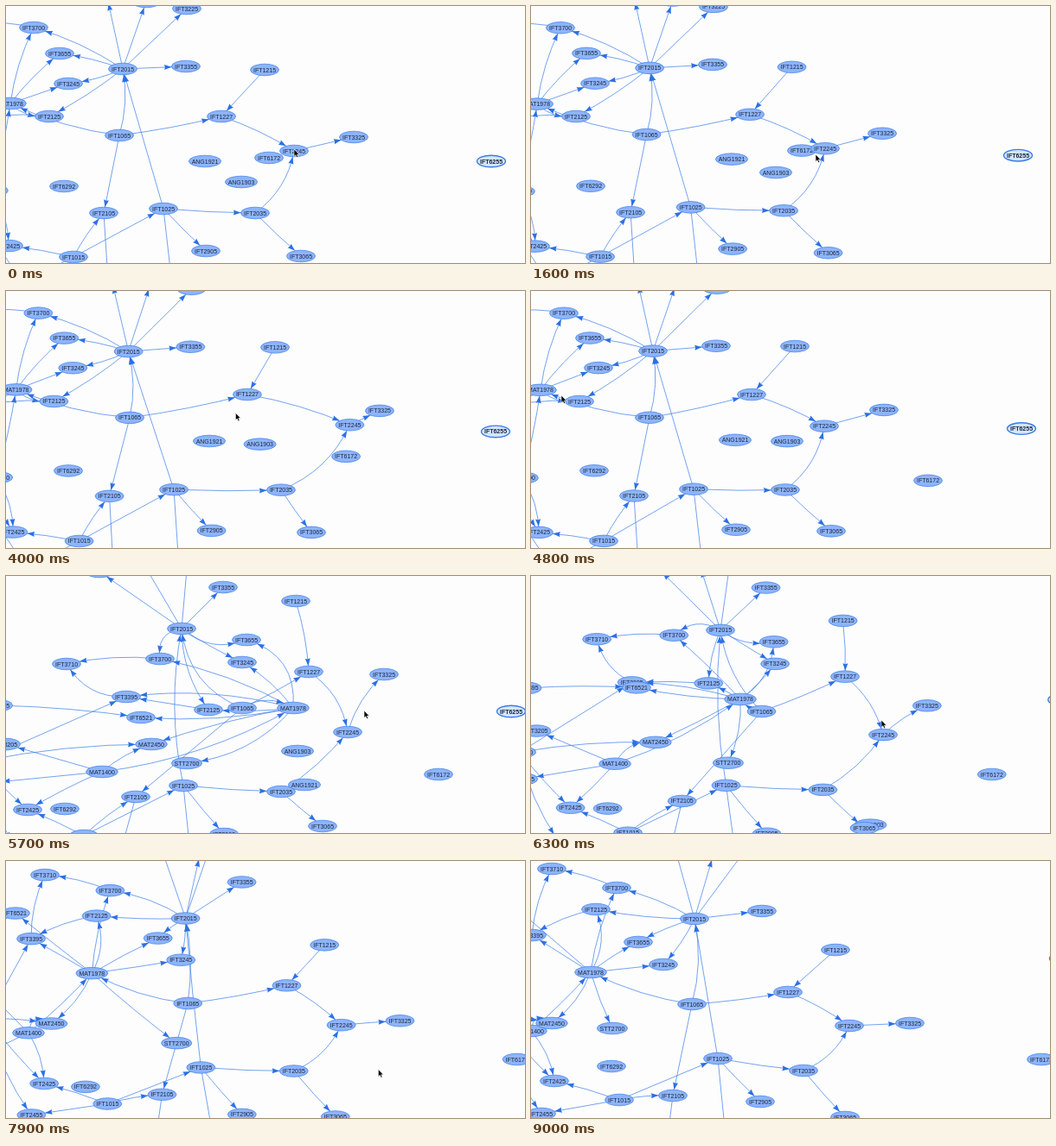
Write an HTML page that moves like this. It is 600x298 px and loops after 9.1 s.

```html
<!DOCTYPE html>
<html lang="fr">
<head>
<meta charset="utf-8">
<title>Course graph</title>
<style>
html, body { margin: 0; width: 100%; height: 100%; overflow: hidden; background: #fdfdfe; }
svg { display: block; width: 100vw; height: 100vh; }
.edge { fill: none; stroke: #3a7be6; stroke-width: .7; }
.head { fill: #2b70e4; }
ellipse { fill: #8db4fb; stroke: #3a7be6; stroke-width: .7; }
text { font: 7px Arial, "Liberation Sans", sans-serif; fill: #1f2839; text-anchor: middle; }
.selected ellipse { fill: #d2e5ff; stroke-width: 1.4; }
.selected text { font-weight: bold; }
.pointer { fill: #000; stroke: #fff; stroke-width: .6; }
</style>
</head>
<body>
<svg viewBox="0 0 600 298" preserveAspectRatio="none">
  <g id="edges"></g>
  <g id="nodes"></g>
  <path id="pointer" class="pointer" d="M0 0V8.4L1.9 6.7L3.2 9.6L4.7 9L3.4 6.2H5.9Z"/>
</svg>
<script>
const LOOP = 9100, STEP = 100;
const GRAB = 4800, RELEASE = 5700, END = 9000;   // the big pull on MAT1978
const RY = 6.8, LAG = .35, SWAY = 25;
const radius = { IFT: 16.5, MAT: 18.4, ANG: 18.6, STT: 17.6 };
const nodes = {}, edges = [], drags = [];
const layer = id => document.getElementById(id);
const clamp = v => Math.min(1, Math.max(0, v));
const ease = u => u * u * (3 - 2 * u);
const lerp = (a, b, k) => a + (b - a) * k;
const mix = (a, b, k) => ({ x: lerp(a.x, b.x, k), y: lerp(a.y, b.y, k) });
const fix = n => n.toFixed(2);

function make(tag, parent, attrs = {}) {
  const el = document.createElementNS('http://www.w3.org/2000/svg', tag);
  for (const key in attrs) el.setAttribute(key, attrs[key]);
  return parent.appendChild(el);
}

// Eased travel through [time, x, y] stops.
function along(stops, t) {
  let i = 0;
  while (i < stops.length - 2 && t >= stops[i + 1][0]) i++;
  const [t0, x, y] = stops[i], [t1, x1, y1] = stops[i + 1];
  return mix({ x, y }, { x: x1, y: y1 }, ease(clamp((t - t0) / (t1 - t0))));
}

// Each node has a home, a place when pulled, and a place to settle.
function node(label, places, lag = LAG) {
  const [home, pulled, settled] = places.split(' ').map(p => {
    const [x, y] = p.split(',').map(Number);
    return { x, y };
  });
  const g = make('g', layer('nodes'));
  const rx = radius[label.slice(0, 3)];
  make('ellipse', g, { rx, ry: RY });
  make('text', g, { y: 2.5 }).textContent = label;
  nodes[label.slice(3)] = { g, rx, home, pulled, settled, lag, links: [] };
}

function edge(from, to, rest = 0, pulled = rest) {
  const a = nodes[from], b = nodes[to];
  a.links.push(b);
  b.links.push(a);
  edges.push({
    from: a, to: b, rest, pulled,
    line: make('path', layer('edges'), { class: 'edge' }),
    head: make('path', layer('edges'), { class: 'head', d: 'M0 0L-8.6 3L-7.7 0L-8.6 -3Z' })
  });
}

// A dragged node tugs its neighbours, less with every link between them.
function drag(id, ...stops) {
  const hops = new Map([[nodes[id], 0]]);
  for (const [n, h] of hops) {
    for (const m of n.links) if (!hops.has(m)) hops.set(m, h + 1);
  }
  const reach = n => hops.has(n) ? .42 ** (hops.get(n) ** 1.3) : 0;
  drags.push({ reach, stops: [[0, 0, 0], ...stops] });
}

// How much of the pull remains; lag is the share left about a third of the way.
function tension(t, lag) {
  if (t < RELEASE) return ease(clamp((t - GRAB) / (RELEASE - GRAB)));
  const u = clamp((t - RELEASE) / (END - RELEASE));
  const left = (1 - u) ** 1.5;
  return left / (left + 2.3 * (1 / lag - 1) * u ** 1.5);
}

function position(n, t) {
  const k = tension(t, n.lag);
  if (t >= RELEASE) {
    const p = mix(n.settled, n.pulled, k);
    const u = clamp((t - RELEASE) / (END - RELEASE));
    p.x += SWAY * Math.sin(Math.PI * u ** .7);
    return p;
  }
  const early = Math.min(t, GRAB), drift = early / GRAB;
  const p = { x: n.home.x + 6 * drift, y: n.home.y + (2 - .04 * n.home.x) * drift };
  for (const { reach, stops } of drags) {
    const pull = along(stops, early), share = reach(n);
    p.x += pull.x * share;
    p.y += pull.y * share;
  }
  return mix(p, n.pulled, k);
}

const away = '-70,138 ';   // waiting left of the stage

node('IFT2255', '117,-10 108,-5 165,-20');
node('IFT3275', '162,-5 158,-16 211,-8');
node('IFT3225', '209,3 211,-30 257,-25', .95);
node('IFT3355', '208,70 251,13 267,58', .95);
node('IFT3710', '-32,20 70,102 24,9');
node('IFT3700', '32,25 178,96 99,31', .25);
node('IFT3245', '72,90 273,100 153,120', .7);
node('IFT3655', '62,55 278,74 124,94', .65);
node('IFT2015', '135,73 203,61 189,67');
node('IFT2125', '50,128 234,155 75,56');
node('IFT1065', '131,150 273,153 186,166');
node('MAT1978', '5,113 332,153 69,129', .25);
node('IFT3395', away + '139,140 1,86');
node('IFT6521', away + '156,164 -20,52');
node('IFT1895', away + '-9,150 -60,85');
node('IFT3205', away + '0,195 -45,145');
node('MAT1500', away + '-30,215 -40,180');
node('IFT1575', away + '-20,240 -50,225');
node('MAT1400', '-16,214 111,227 0,197');
node('MAT2450', away + '168,195 24,188');
node('STT2700', away + '209,217 94,194', .95);
node('IFT1215', '299,74 335,29 352,103');
node('IFT1227', '249,128 350,111 297,152', .6);
node('IFT6172', '304,176 500,230 590,230', .6);
node('IFT2245', '333,168 395,181 368,191');
node('IFT3325', '402,152 437,114 438,188', .2);
node('IFT2035', '288,240 318,250 315,243');
node('ANG1921', '230,180 345,242 420,500');
node('ANG1903', '272,204 337,203 450,480');
node('IFT6255', '561,180 584,157 616,113');
node('IFT1025', '182,235 205,243 216,229', .95);
node('IFT2105', '113,240 150,256 164,272');
node('IFT1015', '78,291 90,301 102,277', .6);
node('IFT2425', '3,278 25,271 27,255', .6);
node('IFT2455', '20,320 10,312 12,293');
node('IFT6292', '67,209 68,270 93,238', .95);
node('IFT2905', '231,284 252,299 265,279', .95);
node('IFT3065', '341,290 366,290 363,297');
node('IFT1005', '195,350 216,350 228,350');
node('IFT2805', '120,350 124,350 154,350');
nodes[6255].g.setAttribute('class', 'selected');

for (const id of [2255, 3275, 3225, 3355]) edge(2015, id);
edge(2015, 3700, .08, .5);
edge(2015, 3655, .06, .3);
edge(2015, 3245, -.08, .04);
edge(2015, 2125, -.05, .16);
edge(1065, 2015, .12, -.3);
edge(1065, 1978, -.08, -.3);
edge(1065, 1227, .03);
edge(1065, 2105);
edge(1025, 2015, 0, -.1);
edge(1978, 3700, -.08, .08);
edge(1978, 3655, -.06, .4);
edge(1978, 3245, 0, .1);
edge(1978, 2125, .25, -.05);
edge(1978, 3395, 0, .1);
edge(1978, 6521, 0, -.07);
edge(1978, 2450, -.15, .04);
edge(1978, 2700, .04, -.2);
edge(2125, 3395, .1, 0);
edge(3700, 3710, .08);
edge(3395, 3710, -.1, -.3);
edge(1895, 6521, -.03);
edge(1500, 3395);
edge(1500, 2450, -.05);
edge(1500, 2425, .04);
edge(1500, 2455, .1);
edge(1400, 1978, .03, .1);
edge(1400, 2450, -.9, -.1);
edge(1400, 2425, -.15, .03);
edge(1400, 3205);
edge(1400, 1575);
edge(1015, 2425, .03);
edge(1015, 2455);
edge(1015, 2105, -.06);
edge(1015, 1025);
edge(1025, 2035, .02);
edge(1025, 2905, .02);
edge(1025, 1005);
edge(2105, 2805);
edge(1215, 1227, 0, -.06);
edge(1227, 2245, -.06, -.22);
edge(2245, 3325, 0, -.14);
edge(2035, 2245, .2, .08);
edge(2035, 3065, .02);

drag(2245, [1600, 5, 1], [3300, 108, -6], [GRAB, 0, 0]);
drag(6172, [1600, 7, -5], [3300, 31, 0], [GRAB, 149, 54]);
drag(1903, [1600, 9, -8], [GRAB, 18, -21]);

const hand = [
  [0, 333, 166], [1600, 329, 172], [3300, 454, 158], [GRAB, 35, 121],
  [RELEASE, 414, 156], [6900, 396, 178], [END, 470, 315]
];

function drawEdge({ from, to, rest, pulled, line, head }, t) {
  const a = from.pos, b = to.pos;
  const bend = lerp(rest, pulled, tension(t, LAG));
  const c = mix(a, b, .5);
  c.x -= (b.y - a.y) * bend;
  c.y += (b.x - a.x) * bend;
  const point = u => mix(mix(a, c, u), mix(c, b, u), u);
  // Find where the curve meets the border of the end node.
  let lo = 0, hi = 1;
  for (let i = 0; i < 16; i++) {
    const mid = (lo + hi) / 2, p = point(mid);
    if (Math.hypot((p.x - b.x) / to.rx, (p.y - b.y) / RY) > 1) lo = mid;
    else hi = mid;
  }
  const length = Math.hypot(b.x - a.x, b.y - a.y) || 1;
  const tip = point(lo), back = point(Math.max(0, lo - 8 / length));
  const angle = Math.atan2(tip.y - back.y, tip.x - back.x) * 180 / Math.PI;
  line.setAttribute('d', `M${fix(a.x)} ${fix(a.y)}Q${fix(c.x)} ${fix(c.y)} ${fix(b.x)} ${fix(b.y)}`);
  place(head, tip, angle);
}

function place(el, p, angle = 0) {
  el.setAttribute('transform', `translate(${fix(p.x)} ${fix(p.y)}) rotate(${fix(angle)})`);
}

function draw(t) {
  for (const n of Object.values(nodes)) place(n.g, n.pos = position(n, t));
  for (const e of edges) drawEdge(e, t);
  place(layer('pointer'), along(hand, t));
}

const start = performance.now();
let shown = -1;
function tick() {
  const t = Math.floor((performance.now() - start) % LOOP / STEP) * STEP;
  if (t !== shown) draw(shown = t);
  requestAnimationFrame(tick);
}
tick();
</script>
</body>
</html>
```
